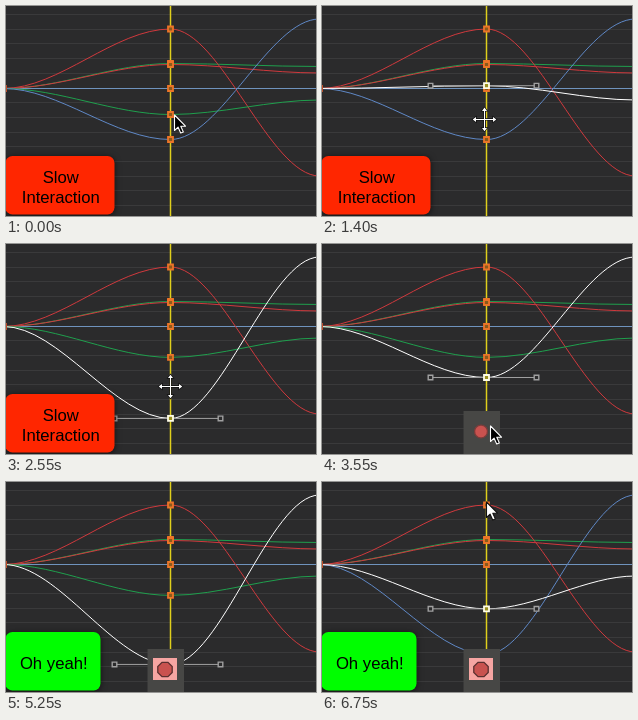
Animation of 310x210 px, one loop 6850 ms. Source, as an HTML page with a canvas:

```html
<!DOCTYPE html>
<html lang="en">
<head>
<meta charset="utf-8">
<title>Curve editor</title>
<style>
html, body { margin: 0; width: 100%; height: 100%; overflow: hidden; background: #2b2b2c; }
canvas { display: block; width: 310px; height: 210px; }
</style>
</head>
<body>
<canvas id="stage" width="310" height="210"></canvas>
<script>
const ctx = document.getElementById('stage').getContext('2d');
const W = 310, H = 210, LOOP = 6850, TICK = 50, UNDO = 3050;
const LEFT = -3, MID = 164, RIGHT = 313, BASE = 82, UNIT = 14.7;
const RED = '#d0393d', GREEN = '#1f9f4d', BLUE = '#5f88c6', WHITE = '#fff';

// The pointer glides to x, y between `from` and `grab`; with an id it then
// swings that key around `mid` until `drop` (phase in rad, speed in rad/s).
const moves = [
  { from: 50, grab: 250, x: 162, y: 109, id: 'green', drop: 1400, mid: 89, amp: 26, phase: -.72, speed: 11.2, slow: true },
  { from: 1600, grab: 1700, x: 164, y: 133, id: 'blue', drop: 2700, mid: 102, amp: 80, phase: -1.17, speed: 10, slow: true },
  { from: 3050, grab: 3500, x: 168, y: 182 },
  { from: 3950, grab: 4125, x: 161, y: 133, id: 'blue', drop: 5342, mid: 110, amp: 88, phase: 1.31, speed: 9.9 },
  { from: 5400, grab: 5600, x: 164, y: 112, id: 'green', drop: 6500, mid: 89, amp: 41, phase: .98, speed: 12.4 },
  { from: 6550, grab: 6750, x: 164, y: 20 }
];

const clamp = (v, lo, hi) => Math.min(hi, Math.max(lo, v));
const ramp = (t, from, to) => clamp((t - from) / (to - from), 0, 1);
const ease = u => u * u * (3 - 2 * u);

function swing(m, t) {
  const s = (clamp(t, m.grab, m.drop) - m.grab) / 1000;
  return m.mid + m.amp * Math.cos(m.phase + m.speed * s);
}

function pointer(t) {
  let x = 168, y = 109, dragging = false;
  for (const m of moves.filter(m => t >= m.from)) {
    const u = ease(ramp(t, m.from, m.grab));
    x += (m.x - x) * u;
    y += (m.y - y) * u;
    dragging = Boolean(m.id) && t >= m.grab;
    if (dragging) y = swing(m, t);
  }
  return { x, y, dragging };
}

// Slow drags refresh rarely, quick ones trail by one tick
const refreshed = (m, t) => m.slow ? Math.floor((t - 150) / 450) * 450 + 150 : t - TICK;

function keyHeight(id, t, rest) {
  const m = moves.filter(m => m.id === id && t >= m.grab).pop();
  if (!m || (id === 'blue' && m.slow && t >= UNDO)) return rest;
  return swing(m, refreshed(m, t));
}

function line(x0, y0, x1, y1, color, width = 1) {
  ctx.strokeStyle = color;
  ctx.lineWidth = width;
  ctx.beginPath();
  ctx.moveTo(x0, y0);
  ctx.lineTo(x1, y1);
  ctx.stroke();
}

function curve({ key, end }, color) {
  const a = (MID - LEFT) / 3, b = (RIGHT - MID) / 3;
  ctx.strokeStyle = color;
  ctx.lineWidth = 1;
  ctx.beginPath();
  ctx.moveTo(LEFT, BASE);
  ctx.bezierCurveTo(LEFT + a, BASE, MID - a, key, MID, key);
  ctx.bezierCurveTo(MID + b, key, RIGHT - b, end, RIGHT, end);
  ctx.stroke();
}

function square(x, y, color, fill, size = 5, width = 1.8) {
  ctx.fillStyle = fill;
  ctx.strokeStyle = color;
  ctx.lineWidth = width;
  ctx.beginPath();
  ctx.rect(x - size / 2, y - size / 2, size, size);
  ctx.fill();
  ctx.stroke();
}

function graph(t) {
  ctx.fillStyle = '#2b2b2c';
  ctx.fillRect(0, 0, W, H);
  ctx.save();
  ctx.translate(.5, .5);
  for (let k = -5; k <= 8; k++) {
    const y = Math.floor(BASE + k * UNIT);
    line(-1, y, W, y, '#3a3a3b');
  }
  const curves = [
    { key: 82, end: 82, color: '#6f93bd' },
    { key: 57, end: 60, color: GREEN },
    { key: 58, end: 66.5, color: RED },
    { key: 22.5, end: 169.5, color: RED },
    { id: 'green', key: keyHeight('green', t, 108), end: 93.5, color: GREEN },
    { id: 'blue', key: keyHeight('blue', t, 133), end: 12.5, color: BLUE }
  ];
  const last = moves.filter(m => m.id && t >= m.grab).pop();
  const active = last && curves.find(c => c.id === last.id);
  const rest = curves.filter(c => c !== active);

  rest.forEach(c => curve(c, c.color));
  if (active) curve(active, WHITE);
  line(MID, -1, MID, H, '#dfcf1c', 1.5);
  for (const c of rest) {
    square(LEFT, BASE, '#c0502c', '#5a3a20');
    square(RIGHT, c.end, '#c0502c', '#5a3a20');
    square(MID, c.key, '#ec7428', '#8a5a1c');
  }
  if (active) {
    const y = active.key;
    line(108, y, 214, y, '#a0a0a0');
    square(108, y, '#a0a0a0', '#2b2b2c', 4.6, 1.4);
    square(214, y, '#a0a0a0', '#2b2b2c', 4.6, 1.4);
    square(MID, y, '#fffde8', '#9a9020');
  }
  ctx.restore();
}

function recorder(t) {
  const on = t >= 3750, sides = on ? 8 : 40, r = on ? 7.8 : 6.4;
  ctx.globalAlpha = ramp(t, 3150, 3400);
  ctx.fillStyle = '#474745';
  ctx.fillRect(141.5, 167, 36.5, 43);
  if (on) {
    ctx.fillStyle = '#f6a5a2';
    ctx.fillRect(147, 176, 24, 22);
  }
  ctx.fillStyle = '#c9524f';
  ctx.strokeStyle = on ? '#5a3030' : '#7a3c3a';
  ctx.lineWidth = 1.3;
  ctx.beginPath();
  for (let i = 0; i < sides; i++) {
    const a = (i + .5) * 2 * Math.PI / sides;
    ctx.lineTo(159 + r * Math.cos(a), 187.5 + r * Math.sin(a));
  }
  ctx.closePath();
  ctx.fill();
  ctx.stroke();
  ctx.globalAlpha = 1;
}

function banner(width, color, rows, alpha) {
  if (!alpha) return;
  ctx.save();
  ctx.globalAlpha = alpha;
  ctx.shadowColor = 'rgba(0,0,0,.6)';
  ctx.shadowBlur = 6;
  ctx.shadowOffsetY = 1;
  ctx.fillStyle = color;
  ctx.beginPath();
  ctx.roundRect(-.5, 150, width + .5, 58.5, 7);
  ctx.fill();
  ctx.shadowColor = 'transparent';
  ctx.fillStyle = '#000';
  ctx.font = '16.7px "Liberation Sans", Arial, sans-serif';
  ctx.textAlign = 'center';
  rows.forEach(([text, y]) => ctx.fillText(text, width / 2 + .5, y));
  ctx.restore();
}

function arrow(x, y, fill, edge) {
  const shape = new Path2D('M0 0V15.5L3.6 12.2L6.2 18L8.8 16.9L6.3 11.2H11Z');
  ctx.save();
  ctx.translate(x + .5, y);
  ctx.lineJoin = 'round';
  ctx.lineWidth = 1.1;
  ctx.strokeStyle = edge;
  ctx.fillStyle = fill;
  ctx.fill(shape);
  ctx.stroke(shape);
  ctx.restore();
}

function cross(x, y) {
  const arms = new Path2D();
  const arm = new Path2D('M-.5 0H.5V-8.5H2.5L0 -11.8L-2.5 -8.5H-.5Z');
  for (let i = 0; i < 4; i++) arms.addPath(arm, new DOMMatrix().rotate(90 * i));
  ctx.save();
  ctx.translate(x + .5, y + .5);
  ctx.lineWidth = 1.4;
  ctx.strokeStyle = '#111';
  ctx.fillStyle = WHITE;
  ctx.stroke(arms);
  ctx.fill(arms);
  ctx.restore();
}

function draw(t) {
  const { x, y, dragging } = pointer(t);
  graph(t);
  if (dragging) cross(x, y);
  recorder(t);
  banner(108.5, '#ff2600', [['Slow', 176.5], ['Interaction', 196.5]], 1 - ramp(t, 3000, 3300));
  banner(94.5, '#00fe00', [['Oh yeah!', 187]], ramp(t, 4700, 4950));
  if (!dragging) arrow(x, y, ...(t < 5400 ? ['#000', WHITE] : [WHITE, '#111']));
}

const start = performance.now();
function loop() {
  const t = (performance.now() - start) % LOOP;
  draw(Math.floor(t / TICK) * TICK);
  requestAnimationFrame(loop);
}
loop();
</script>
</body>
</html>
```
